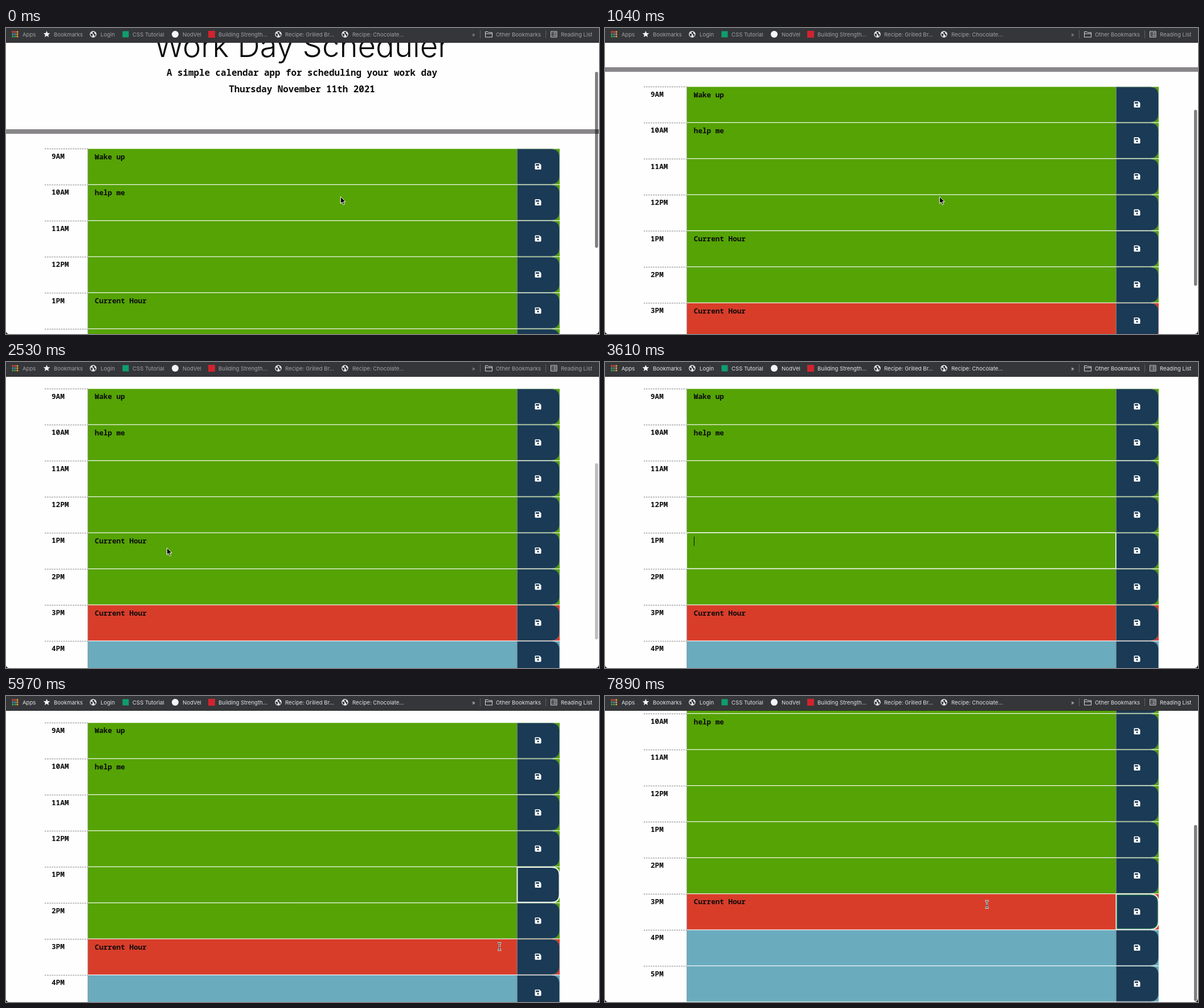
An HTML page for the animation above (8000 ms loop, 1041 by 538 pixels).

```html
<!DOCTYPE html>
<html lang="en">
<head>
<meta charset="utf-8">
<title>Work Day Scheduler</title>
<style>
  html, body { margin: 0; width: 100%; height: 100%; overflow: hidden; background: #fefefe; }
  svg { display: block; width: 1041px; height: 538px; }
  text { white-space: pre; }
  .mono { font: 600 12.67px "Noto Sans Mono", "DejaVu Sans Mono", monospace; fill: #0b0b0b; }
  .sub { font-size: 15.84px; text-anchor: middle; }
  .title { font: 300 54.5px Inter, "Liberation Sans", sans-serif; text-anchor: middle; fill: #0b0b0b; }
  .mark { font: 9.6px Inter, "Liberation Sans", sans-serif; }
</style>
</head>
<body>
<svg id="stage" viewBox="0 0 1041 538">
  <defs>
    <clipPath id="view"><rect y="26" width="1041" height="512"/></clipPath>
    <path id="disk" fill="#fff" fill-rule="evenodd" d="M1.3 0H8L11 3V9.7A1.3 1.3 0 0 1 9.7 11H1.3A1.3 1.3 0 0 1 0 9.7V1.3A1.3 1.3 0 0 1 1.3 0ZM1.6 1.6V4.3H7.4V1.6ZM5.5 5.9a1.55 1.55 0 1 0 .01 0Z"/>
    <g id="globe">
      <circle r="5.8" fill="#f1f1f1"/>
      <path fill="#353639" d="M-4.6 -1.6L-1.4 -.6L-.2 1.4L-1.6 2.2L-1.4 4.4Q-4.6 3.2 -4.6 -1.6ZM-.8 -4.5L2.6 -3.8L1.6 -2L3.6 -.4L4.6 .6Q4.4 3 2.4 4L1.8 1.4L.2 -.6L-1.4 -2Z"/>
    </g>
    <g id="arrow">
      <path d="M0 0V12.2L2.8 9.6L4.9 14.4L7 13.5L5 8.9H8.8Z" fill="#000" stroke="#fff" stroke-width="1" stroke-linejoin="round"/>
    </g>
    <g id="beam" fill="none">
      <path id="beamLine" d="M-3 -6.3Q-.4 -6.3 0 -5Q.4 -6.3 3 -6.3M-3 6.3Q-.4 6.3 0 5Q.4 6.3 3 6.3M0 -5V5M-1.6 2H1.6" stroke="#fff" stroke-width="2.6"/>
      <use href="#beamLine" style="stroke:#111"/>
      <path d="M-3 -6.3Q-.4 -6.3 0 -5Q.4 -6.3 3 -6.3M-3 6.3Q-.4 6.3 0 5Q.4 6.3 3 6.3M0 -5V5M-1.6 2H1.6" stroke="#111" stroke-width="1.1"/>
    </g>
    <path id="hand" d="M-2.6 1V-6.6Q-1.6 -8.2 -.6 -6.6V-2.2Q.8 -3 1.5 -1.8Q2.8 -2.5 3.5 -1.3Q5.6 -1.8 5.6 .4V3.4L4.4 7.6H-2.2L-5.8 2.2Q-6.4 .2 -4.4 .2Z" fill="#000" stroke="#fff" stroke-width="1" stroke-linejoin="round"/>
  </defs>

  <g clip-path="url(#view)">
    <g id="page"></g>
    <rect id="thumb" x="1034" width="5.4" height="309.5" rx="2.7" fill="#000" fill-opacity=".5"/>
  </g>
  <path fill="#0c1016" d="M0 533Q.4 537.6 5 538H0ZM1041 532Q1040.5 537.6 1035 538H1041Z"/>

  <rect width="1041" height="26" fill="#353639"/>
  <rect y="25" width="1041" height="1" fill="#2b2c2e"/>
  <g id="icons">
    <path fill="#f4f4f4" d="M71.5 5L73.1 8.9L77.3 9.2L74.1 11.9L75.1 16L71.5 13.8L67.9 16L68.9 11.9L65.7 9.2L69.9 8.9Z"/>
    <use href="#globe" x="153" y="11"/>
    <rect x="204.5" y="5.5" width="11" height="11" fill="#0f9d6c"/>
    <circle cx="297" cy="11" r="6" fill="#f5f5f5"/>
    <rect x="355" y="5" width="12" height="12" fill="#cf2430"/>
    <use href="#globe" x="478" y="11"/>
    <use href="#globe" x="595" y="11"/>
    <path fill="none" stroke="#d8d9db" d="M841.5 16V6.5H846L847.5 8H853.5V16ZM841.5 10H853.5M956.5 6H967V16H956.5ZM958.3 8.5H959.6M961 8.5H965.5M958.3 11H959.6M961 11H965.5M958.3 13.5H959.6M961 13.5H965.5"/>
    <path stroke="#5d5e61" d="M832.5 4V18M947.5 4V18"/>
  </g>
  <g id="marks" class="mark"></g>
  <use id="pointer"/>
</svg>

<script>
const LOOP = 8000, PITCH = 63.38;
const GREEN = '#55a305', RED = '#d83d2a', BLUE = '#6aacbe';
const $ = id => document.getElementById(id);

function add(parent, tag, attrs, text) {
  const el = document.createElementNS('http://www.w3.org/2000/svg', tag);
  for (const k in attrs) el.setAttribute(k, attrs[k]);
  if (text) el.textContent = text;
  return parent.appendChild(el);
}
const show = (el, on) => el.setAttribute('visibility', on ? 'visible' : 'hidden');

// Last entry of a [time, ...] table that has begun
const at = (table, t) => table.findLast(row => row[0] <= t);
const within = (t, from, to) => t >= from && t < to;

// Bookmarks bar
[[29, 'Apps'], [84, 'Bookmarks'], [166, 'Login'], [222, 'CSS Tutorial'], [310, 'NodVel'],
 [373, 'Building Strength...'], [490, 'Recipe: Grilled Br...'], [608, 'Recipe: Chocolate...'],
 [818, '»'], [860, 'Other Bookmarks'], [974, 'Reading List']]
  .forEach(([x, s]) => add($('marks'), 'text', { x, y: 14.6 }, s));
const dots = ['#e2493b', '#e2493b', '#eda33a', '#43a45a', '#4a86e0', '#eda33a', '#43a45a', '#43a45a', '#eda33a'];
dots.forEach((fill, i) => add($('icons'), 'rect',
  { x: 10.5 + i % 3 * 4, y: 5.5 + Math.floor(i / 3) * 4, width: 2.8, height: 2.8, fill }));

// Page content; y = 0 is the top of the first row
const page = $('page');
add(page, 'text', { class: 'title', x: 519, y: -161.5 }, 'Work Day Scheduler');
add(page, 'text', { class: 'mono sub', x: 519.5, y: -128 }, 'A simple calendar app for scheduling your work day');
add(page, 'text', { class: 'mono sub', x: 519.5, y: -99.5 }, 'Thursday November 11th 2021');
add(page, 'rect', { y: -34, width: 1041, height: 8, fill: '#888689' });

const notes = { 0: 'Wake up', 1: 'help me', 4: 'Current Hour', 6: 'Current Hour' };
const buttonPath = 'M897.5 .8H957.5Q971.5 .8 971.5 14.8V48.4Q971.5 62.4 957.5 62.4H897.5Z';
const rows = ['9AM', '10AM', '11AM', '12PM', '1PM', '2PM', '3PM', '4PM', '5PM'].map((hour, i) => {
  const g = add(page, 'g', { transform: `translate(0 ${i * PITCH})` });
  const fill = i < 6 ? GREEN : i === 6 ? RED : BLUE;
  add(g, 'path', { d: 'M68 .5H143.5', stroke: '#77777a', 'stroke-dasharray': '2.5 1.6' });
  add(g, 'rect', { x: 143.5, y: .5, width: 828.5, height: 62.2, fill });
  add(g, 'path', { d: 'M144 .5V62.5M897 .5V62.5', stroke: '#80868a', 'stroke-opacity': .6 });
  add(g, 'path', { d: buttonPath, fill: '#1a3a55', stroke: '#7d8f96', 'stroke-width': .6 });
  add(g, 'use', { href: '#disk', x: 928.5, y: 25.7 });
  add(g, 'text', { class: 'mono', x: 80, y: 18 }, hour);
  return { g, note: add(g, 'text', { class: 'mono', x: 155.8, y: 18.7 }, notes[i] || '') };
});

function focusRing(row, inner) {
  const ring = add(rows[row].g, 'g', { fill: 'none' });
  add(ring, 'path', { d: buttonPath, stroke: '#f2f6ee', 'stroke-width': 2 });
  if (inner) add(ring, 'path', { d: 'M899 2H957Q970 2 970 15V48Q970 61.2 957 61.2H899Z', stroke: '#23774a', 'stroke-width': 1.2 });
  return ring;
}
const edit = rows[4];
const fieldRing = add(edit.g, 'rect', { x: 143.2, y: 0, width: 753.6, height: 63, rx: 1.5, fill: 'none', stroke: '#f0f7ea', 'stroke-width': 1.6 });
const select = add(edit.g, 'rect', { x: 156, y: 6, width: 91, height: 17, fill: '#b4d5fe' });
edit.g.insertBefore(select, edit.note);
const caret = add(edit.g, 'rect', { x: 156, y: 6.6, width: 1, height: 16.4, fill: '#0b0b0b' });
const ringOne = focusRing(4, false), ringThree = focusRing(6, true);

// [time, top of first row]
const scroll = [[0, 212], [150, 204], [300, 187], [450, 167], [600, 147], [750, 129], [890, 115], [1040, 103],
  [1190, 92], [1340, 82], [1490, 72], [1640, 61.7], [1780, 53], [1930, 46.8],
  [7440, 40], [7590, 14], [7740, -17], [7890, -32.5]];

// [time, shape, x, y]
const path = [[0, 'arrow', 587.3, 296.5], [2230, 'arrow', 540, 303], [2380, 'arrow', 400, 317],
  [2530, 'arrow', 282.5, 326.8], [2680, 'arrow', 238, 312], [2830, 'beam', 232, 315], [3610, ''],
  [4210, 'beam', 300, 330], [4350, 'beam', 450, 346], [4500, 'beam', 590, 357], [4640, 'beam', 705, 362],
  [4790, 'beam', 790, 358], [4930, 'beam', 852, 349], [5080, 'beam', 889, 341], [5230, 'hand', 922, 335],
  [5830, 'hand', 905, 385], [5970, 'beam', 866.3, 440.7], [6120, 'beam', 884, 457], [6270, 'hand', 919, 468],
  [6850, 'beam', 790, 410], [7000, 'beam', 670.6, 366.3]];

const thumbFade = [[0, .5], [2380, .4], [2530, .26], [2680, 0], [7440, .5]];
const caretBlink = [[0, 0], [2830, 1], [3010, 0], [3610, 1], [4060, 0], [4640, 1], [5080, 0]];

function draw(t) {
  const y = at(scroll, t)[1];
  page.setAttribute('transform', `translate(0 ${y})`);
  $('thumb').setAttribute('y', 77 + (212 - y) * .612);
  $('thumb').setAttribute('fill-opacity', at(thumbFade, t)[1]);
  $('marks').setAttribute('fill', t < 2830 ? '#a0a1a4' : '#e3e4e7');

  show(edit.note, t < 3610);
  show(select, within(t, 3010, 3610));
  show(fieldRing, within(t, 2830, 5380));
  show(caret, at(caretBlink, t)[1]);
  show(ringOne, within(t, 5380, 6410));
  show(ringThree, t >= 6410);

  const [, shape, px, py] = at(path, t);
  show($('pointer'), shape);
  if (shape) {
    $('pointer').setAttribute('href', '#' + shape);
    $('pointer').setAttribute('transform', `translate(${px} ${py})`);
  }
}

function tick() {
  draw(performance.now() % LOOP);
  requestAnimationFrame(tick);
}
tick();
</script>
</body>
</html>
```
